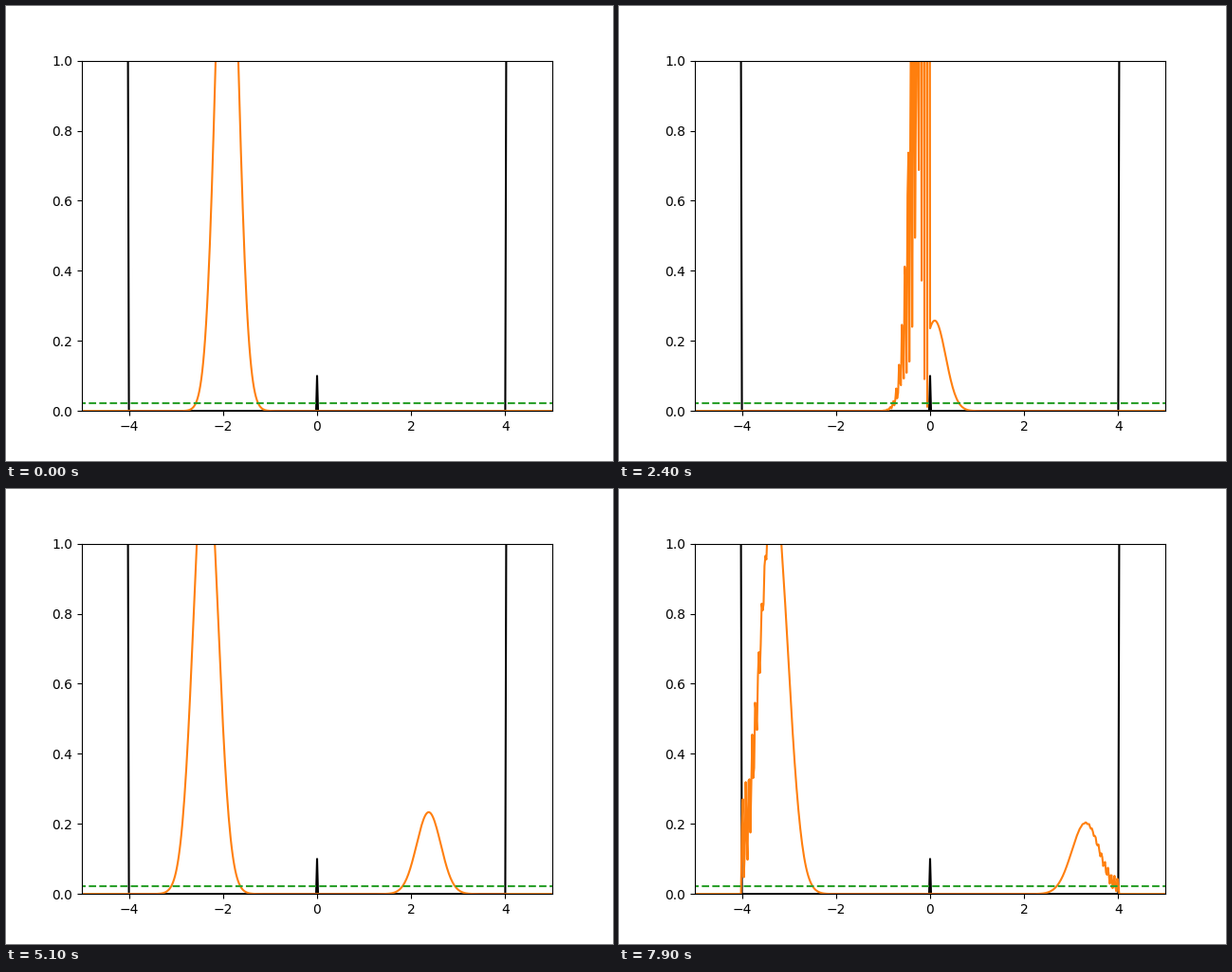
A matplotlib script for the animation above (8000 ms loop, 640x480 px).

```python
import numpy as np
import matplotlib.pyplot as plt
from matplotlib.animation import FuncAnimation

# Wave packet hitting a thin barrier inside a box (hbar = m = 1)
DX, DT = 0.02, 0.002
FRAMES, INTERVAL = 80, 100
X0, K0 = -2.0, 50.0
BARRIER, WALL = 5e3, 5e4

x = DX * np.arange(-250, 251)

V = np.where(np.abs(x) > 4 + DX / 2, WALL, 0.0)
V[np.abs(x) < DX / 2] = BARRIER

hop = 1 / (2 * DX**2)
off = np.full(x.size - 1, -hop)
H = np.diag(V + 2 * hop) + np.diag(off, 1) + np.diag(off, -1)
levels, modes = np.linalg.eigh(H)

psi0 = np.exp(-5 * (x - X0)**2 + 1j * K0 * x)
psi0 /= np.sqrt(np.sum(np.abs(psi0)**2) * DX)
coef = modes.T @ psi0
energy = np.sum(levels * np.abs(coef)**2) * DX


def density(n):
    """Probability density after n + 1 time steps."""
    psi = modes @ (coef * np.exp(-1j * levels * DT * (n + 1)))
    return np.abs(psi)**2


fig, ax = plt.subplots(figsize=(6.4, 4.8), dpi=100)
ax.plot(x, V / WALL, color="black")
packet, = ax.plot(x, density(0), color="C1")
ax.plot([-10, 10], [energy / WALL] * 2, "--", color="C2")
ax.set_xlim(-5, 5)
ax.set_ylim(0, 1)


def update(n):
    packet.set_ydata(density(n))
    return packet,


def init():
    return update(0)


anim = FuncAnimation(fig, update, frames=FRAMES, init_func=init,
                     interval=INTERVAL, repeat=True, repeat_delay=0)
plt.show()
```
